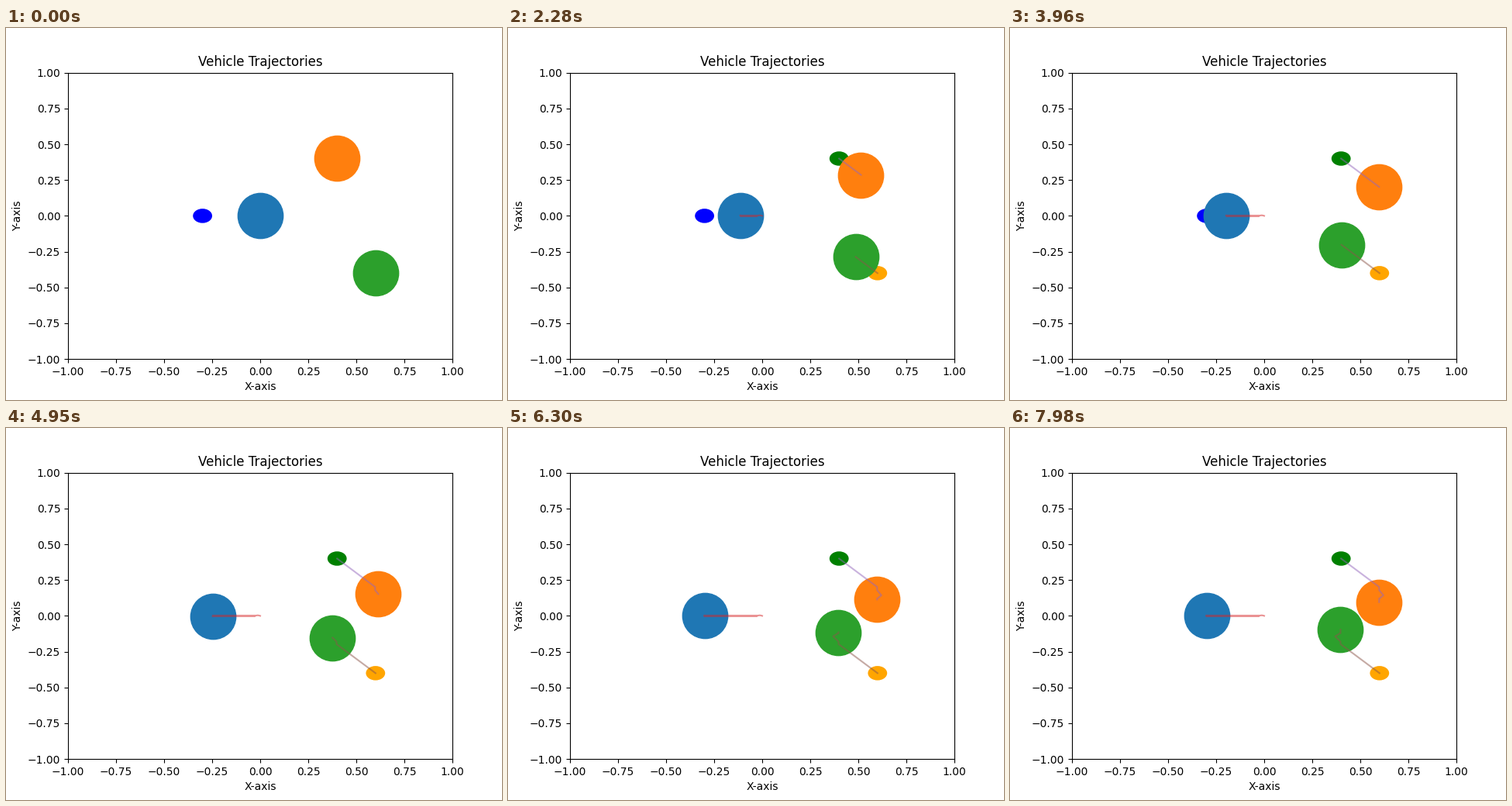
Animation of 640x480 px, one loop 8 s. Source, as a matplotlib script:

```python
import numpy as np
import matplotlib.pyplot as plt
from matplotlib.animation import FuncAnimation

LOOP = 8000      # ms
INTERVAL = 20    # ms
STEP_MS = 30     # one simulation step
N_STEPS = 267
SPEED = 0.0015   # cruise speed per step and axis
CREEP = 0.00033  # speed once two vehicles are close
BRAKE = 185      # step at which cruising ends
WOBBLE = 0.0025  # steering chatter of the straight vehicle
SETTLE = 18      # steps before the chatter sets in

steps = np.arange(N_STEPS)
travel = SPEED * steps

# The straight vehicle drifts once, then overcorrects on every step.
chatter = np.where(steps < SETTLE,
                   1.5 * WOBBLE * np.sin(np.pi * steps / SETTLE),
                   WOBBLE * (-1.0) ** steps)

# The other two approach each other, swerve apart and slow down.
swerve = np.interp(steps, [147, 171, 187], [0, 1, 0])
gap = 0.4 - np.minimum(travel, SPEED * BRAKE) \
    - CREEP * np.maximum(steps - BRAKE, 0)

paths = [
    (np.maximum(-travel, -0.3), chatter),
    (np.minimum(0.4 + travel, 0.598) + 0.022 * swerve, gap),
    (np.maximum(0.6 - travel, 0.397) - 0.028 * swerve, -gap),
]

fig, ax = plt.subplots(figsize=(6.4, 4.8), dpi=100)
ax.set(xlim=(-1, 1), ylim=(-1, 1), title="Vehicle Trajectories",
       xlabel="X-axis", ylabel="Y-axis")

for center, color in [((-0.3, 0), "blue"), ((0.4, 0.4), "green"),
                      ((0.6, -0.4), "orange")]:
    ax.add_patch(plt.Circle(center, 0.05, facecolor=color, edgecolor="none"))

discs = [ax.plot([], [], "o", color=f"C{i}", markersize=42)[0]
         for i in range(3)]
trails = [ax.plot([], [], "-", color=f"C{i + 3}", alpha=0.5)[0]
          for i in range(3)]


def update(frame):
    step = min((frame * INTERVAL + INTERVAL // 2) // STEP_MS, N_STEPS - 1)
    for disc, trail, (x, y) in zip(discs, trails, paths):
        disc.set_data([x[step]], [y[step]])
        trail.set_data(x[:step + 1], y[:step + 1])
    return discs + trails


anim = FuncAnimation(fig, update, frames=LOOP // INTERVAL, interval=INTERVAL,
                     init_func=lambda: update(0), repeat=True, repeat_delay=0)
plt.show()
```
